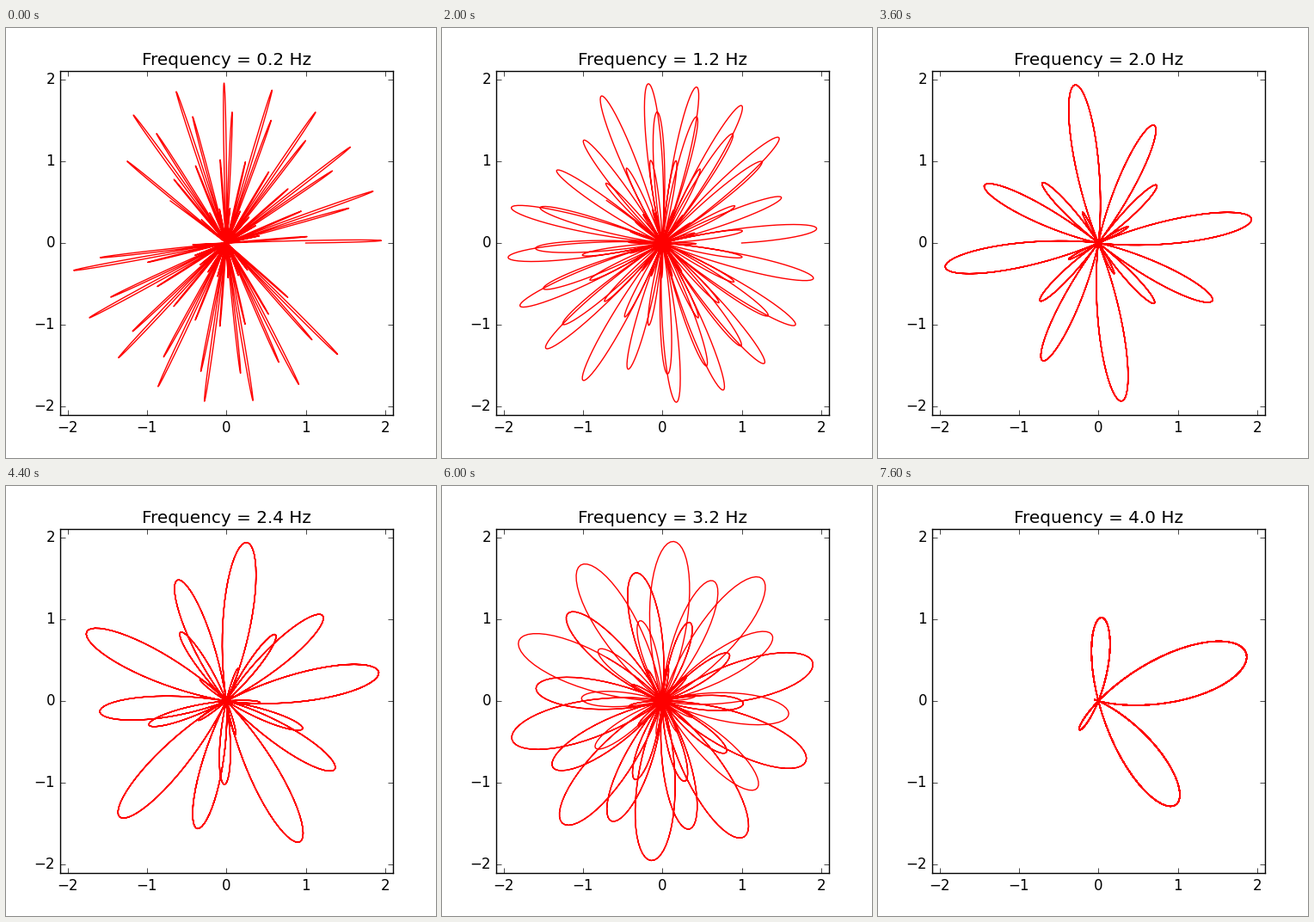
These frames come from a looping animation (500 by 500 pixels, 8 s). A matplotlib script:

```python
import numpy as np
import matplotlib.pyplot as plt
from matplotlib.animation import FuncAnimation

FRAMES = 20
INTERVAL = 400   # ms
FREQ_STEP = 0.2  # Hz added per frame

plt.style.use("classic")
plt.rcParams.update({
    "figure.facecolor": "white",
    "font.family": "DejaVu Sans",
    "font.size": 12,
})

t = np.arange(0, 2, 0.001)
signal = np.cos(2 * np.pi * 4 * t) + np.sin(2 * np.pi * 20 * t)

fig = plt.figure(figsize=(5, 5), dpi=100)
ax = fig.add_axes([0.125, 0.1, 0.775, 0.8])
ax.set_xlim(-2.1, 2.1)
ax.set_ylim(-2.1, 2.1)
ax.set_xticks(range(-2, 3))
ax.set_yticks(range(-2, 3))
curve, = ax.plot([], [], color="red", linewidth=1)
title = ax.set_title("")


def update(frame):
    """Wind the signal around the origin at the frame's frequency."""
    freq = FREQ_STEP * (frame + 1)
    wound = signal * np.exp(2j * np.pi * freq * t)
    curve.set_data(wound.real, wound.imag)
    title.set_text(f"Frequency = {freq:.1f} Hz")
    return curve, title


anim = FuncAnimation(fig, update, frames=FRAMES, interval=INTERVAL,
                     init_func=lambda: update(0), repeat=True, repeat_delay=0)
plt.show()
```
